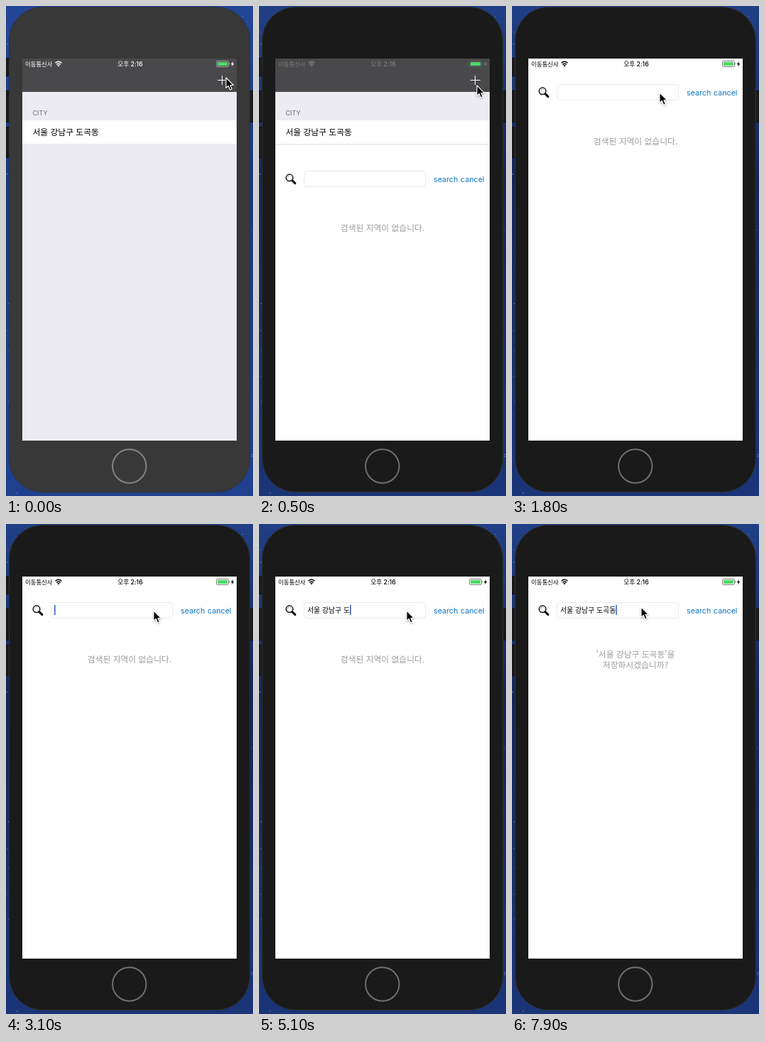
An HTML page that plays this animation: 348 px wide and 690 px high, repeating every 8000 ms.

```html
<!DOCTYPE html>
<html lang="ko">
<head>
<meta charset="utf-8">
<style>
html, body { margin: 0; width: 100%; height: 100%; overflow: hidden; background: #142a66; }
svg { display: block; }
text { font-family: Inter, "Noto Sans CJK KR", "Noto Sans CJK", sans-serif; white-space: pre; }
.ko { font-family: "Noto Sans CJK KR", "Noto Sans CJK", "Noto Sans", sans-serif; }
.mid { text-anchor: middle; }
.note { font-size: 11.8px; fill: #9b9b9b; }
.link { font-size: 10.7px; fill: #0b74c4; }
</style>
</head>
<body>
<svg width="348" height="690" viewBox="0 0 348 690">
  <defs>
    <linearGradient id="sky" x2="0" y2="1">
      <stop offset="0" stop-color="#203f86"/>
      <stop offset=".35" stop-color="#122558"/>
      <stop offset="1" stop-color="#1a3578"/>
    </linearGradient>
    <clipPath id="screen"><path d="M23 74H325V612H23Z"/></clipPath>
    <filter id="soft" x="-50%" y="-50%" width="200%" height="200%">
      <feDropShadow dx="0" dy="1" stdDeviation="1" flood-opacity=".4"/>
    </filter>
  </defs>

  <path fill="url(#sky)" d="M0 0H348V690H0Z"/>
  <path id="glow" fill="#2850b0" opacity=".4" d="M0 0H348V690H0Z"/>
  <g id="stars" fill="#a9c2ee"></g>

  <path fill="#1b1b1d" stroke="#0b0b0d" d="M0 73.5H7V98.5H0ZM0 119.5H7V163.5H0ZM0 170.5H7V213.5H0ZM340 119.5H348V163.5H340Z"/>
  <rect id="body" x="4.5" y="1.5" width="339" height="683" rx="47" stroke="#303136"/>
  <circle id="home" cx="173.8" cy="648" r="23.7" fill="none" stroke-width="2"/>

  <g clip-path="url(#screen)">
    <path fill="#ebebf1" d="M23 74H325V612H23Z"/>
    <path fill="#49494b" d="M23 74H325V121H23Z"/>
    <path fill="#fff" d="M23 161H325V194H23Z"/>
    <path stroke="#fff" d="M298 104.5H312M304.5 98V111"/>
    <text x="37.5" y="153.7" font-size="9" fill="#6d6d72">CITY</text>
    <text class="ko" x="37.5" y="182" font-size="11.8">서울 강남구 도곡동</text>

    <g id="sheet">
      <path fill="#fff" d="M23 74H325V613H23Z"/>
      <g fill="none" stroke="#111">
        <circle cx="43" cy="119.8" r="4.8" stroke-width="1.5"/>
        <path d="M40.3 119.5Q40.6 117.3 42.7 117" stroke="#888" stroke-width=".8"/>
        <path d="M46.8 123.6L50.8 127.6" stroke-width="3" stroke-linecap="round"/>
      </g>
      <rect x="63.5" y="110.5" width="171" height="22" rx="4" fill="#fff" stroke="#ebebeb"/>
      <text id="typed" class="ko" x="68" y="124.8" font-size="9.9"></text>
      <path id="caret" fill="#3d62d0" d="M0 114H1.6V128H0Z"/>
      <text class="link" x="246" y="125.5">search</text>
      <text class="link" x="284" y="125.5">cancel</text>
      <text id="empty" class="ko note mid" x="174" y="195">검색된 지역이 없습니다.</text>
      <g id="confirm" class="note">
        <text class="ko mid" x="174" y="187.5">'서울 강남구 도곡동'을</text>
        <text class="ko mid" x="174" y="202.5">저장하시겠습니까?</text>
      </g>
    </g>

    <g id="status">
      <text class="ko" x="27" y="84.6" font-size="8.4">이동통신사</text>
      <text class="mid" x="175" y="84.6" font-size="8.7" font-weight="500">오후 2:16</text>
      <g fill="none" stroke="currentColor" stroke-width="1.5">
        <path d="M69.5 80.3Q74 76.3 78.5 80.3M71.3 82.4Q74 80 76.7 82.4"/>
      </g>
      <path d="M72.3 83.6Q74 82.2 75.7 83.6L74 85.6Z"/>
      <rect x="296.5" y="77.5" width="17" height="8" rx="1.8" fill="none" stroke="currentColor" stroke-width=".8" opacity=".65"/>
      <rect x="298" y="79" width="14" height="5" rx=".6" fill="#4cd964"/>
      <path d="M314.6 80Q316 81.5 314.6 83ZM320 77.8L316.8 82.2H318.8L318 85.4L321.4 80.9H319.3Z"/>
    </g>
  </g>

  <path id="cursor" filter="url(#soft)" fill="#000" stroke="#fff" stroke-width="1.1" stroke-linejoin="round"
    d="M0 0V14.4L3.3 11.4L5.6 17L8.2 15.9L5.9 10.5H10.4Z"/>
</svg>

<script>
const LOOP = 8000, WAKE = 100, TAP = 350, FOCUS = 1950, FOUND = 7150;
const TYPE_START = 3200, KEY_TIME = 110;
const el = id => document.getElementById(id);

// Text after every keystroke while the syllables are composed
const steps = ['', ...compose('', 'ㅅ 서 성 서우 서울'), '서울 ',
  ...compose('서울 ', 'ㄱ 가 강 강ㄴ 강나 강남 강남ㄱ 강남구'), '서울 강남구 ',
  ...compose('서울 강남구 ', 'ㄷ 도 독 도고 도곡 도곡ㄷ 도곡도 도곡동')];
const TYPE_END = TYPE_START + KEY_TIME * (steps.length - 1);

// time, x, y of the pointer tip
const path = [[0, 310, 101], [400, 310, 101], [800, 291, 170], [1600, 208, 122],
  [5950, 208, 122], [6400, 230, 121], [6750, 262, 122], [7050, 262, 122],
  [7750, 182, 117], [LOOP, 182, 117]];

function compose(before, parts) {
  return parts.split(' ').map(part => before + part);
}

function pointerAt(t) {
  const i = path.findIndex(p => p[0] > t);
  const [t0, x0, y0] = path[i - 1], [t1, x1, y1] = path[i];
  const u = (t - t0) / (t1 - t0), k = u * u * (3 - 2 * u);
  return [x0 + (x1 - x0) * k, y0 + (y1 - y0) * k];
}

// Critically damped slide
function sheetOffset(t) {
  const x = Math.max(0, t - TAP) * 0.0187;
  return Math.round(538 * (1 + x) * Math.exp(-x));
}

function caretOn(t) {
  if (t < FOCUS) return false;
  if (t >= TYPE_START && t < TYPE_END) return true;
  return (t - (t < TYPE_START ? FOCUS : TYPE_END)) % 1000 < 500;
}

function show(id, on) {
  el(id).style.display = on ? '' : 'none';
}

function draw(t) {
  const awake = t >= WAKE;
  el('body').setAttribute('fill', awake ? '#1a1a1a' : '#383838');
  el('home').setAttribute('stroke', awake ? '#707070' : '#858585');
  show('glow', !awake);

  el('sheet').setAttribute('transform', `translate(0 ${sheetOffset(t)})`);
  const ink = Math.round(255 * Math.min(1, Math.max(0, 1 - (t - TAP) / 300)));
  el('status').style.fill = el('status').style.color = `rgb(${ink},${ink},${ink})`;

  const key = Math.floor((t - TYPE_START) / KEY_TIME);
  const typed = el('typed');
  typed.textContent = steps[Math.max(0, Math.min(steps.length - 1, key))];
  el('caret').setAttribute('transform', `translate(${68 + typed.getComputedTextLength()} 0)`);
  show('caret', caretOn(t));
  show('empty', t < FOUND);
  show('confirm', t >= FOUND);
  el('cursor').setAttribute('transform', `translate(${pointerAt(t)})`);
}

let seed = 7;
const random = () => (seed = seed * 16807 % 2147483647) / 2147483647;
for (let i = 0; i < 110; i++) {
  const x = random() < 0.5 ? random() * 16 : 348 - random() * 16;
  el('stars').insertAdjacentHTML('beforeend',
    `<circle cx="${x}" cy="${random() * 690}" r="${0.3 + random() * 0.6}" opacity="${0.3 + random() * 0.6}"/>`);
}

const start = performance.now();
function tick() {
  draw((performance.now() - start) % LOOP);
  requestAnimationFrame(tick);
}
tick();
</script>
</body>
</html>
```
